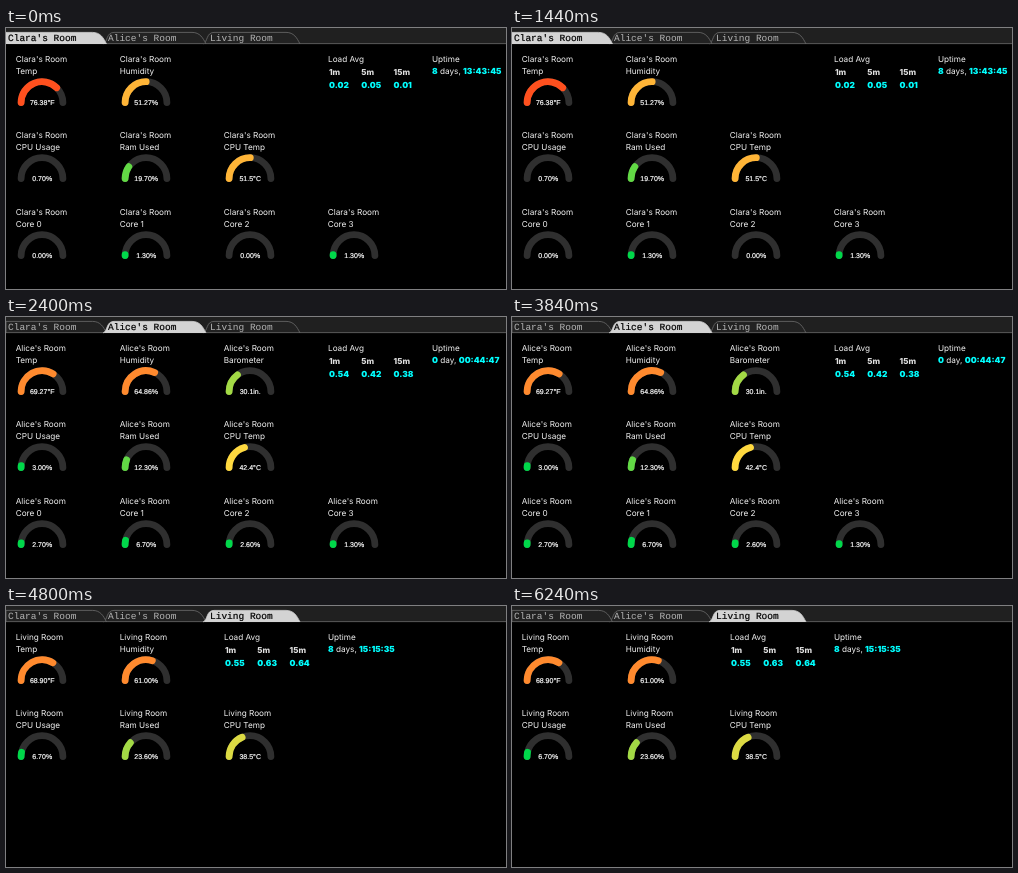
An HTML page for the animation above (7.2 s loop, 500 px wide and 261 px high).

```html
<!DOCTYPE html>
<html lang="en">
<head>
<meta charset="utf-8">
<title>Room monitor</title>
<style>
  html, body { margin: 0; width: 100%; height: 100%; overflow: hidden; background: #000; }
  svg { display: block; }
  text { white-space: pre; text-rendering: geometricPrecision; }
  .tab { font: 9.5px "Liberation Mono", "Courier New", monospace; fill: #b4b4b4; }
  .tab.on { fill: #000; stroke: #000; stroke-width: .2; }
  .label { font: 430 8.2px Inter, sans-serif; fill: #f0f0f0; }
  .value { font: 7px "Liberation Sans", Arial, sans-serif; fill: #fff; stroke: #fff; stroke-width: .2; text-anchor: middle; }
  .head { font: 800 8.2px Inter, sans-serif; fill: #e0e0e0; }
  .num { font: 900 8.4px Inter, sans-serif; fill: #0ff; }
</style>
</head>
<body>
<svg id="stage" width="500" height="261" viewBox="0 0 500 261"></svg>
<script>
const NS = "http://www.w3.org/2000/svg";
const stage = document.getElementById("stage");
const HOLD = 2400;
const COL = 104, ROW = 76.5;

const rooms = [
  {
    name: "Clara's Room",
    rows: [
      [["Temp", "76.38°F"], ["Humidity", "51.27%"]],
      [["CPU Usage", "0.70%"], ["Ram Used", "19.70%"], ["CPU Temp", "51.5°C"]],
      [["Core 0", "0.00%"], ["Core 1", "1.30%"], ["Core 2", "0.00%"], ["Core 3", "1.30%"]]
    ],
    load: ["0.02", "0.05", "0.01"], loadCol: 3,
    up: ["8", " days, ", "13:43:45"]
  },
  {
    name: "Alice's Room",
    rows: [
      [["Temp", "69.27°F"], ["Humidity", "64.86%"], ["Barometer", "30.1in."]],
      [["CPU Usage", "3.00%"], ["Ram Used", "12.30%"], ["CPU Temp", "42.4°C"]],
      [["Core 0", "2.70%"], ["Core 1", "6.70%"], ["Core 2", "2.60%"], ["Core 3", "1.30%"]]
    ],
    load: ["0.54", "0.42", "0.38"], loadCol: 3,
    up: ["0", " day, ", "00:44:47"]
  },
  {
    name: "Living Room",
    rows: [
      [["Temp", "68.90°F"], ["Humidity", "61.00%"]],
      [["CPU Usage", "6.70%"], ["Ram Used", "23.60%"], ["CPU Temp", "38.5°C"]]
    ],
    load: ["0.55", "0.63", "0.64"], loadCol: 2,
    up: ["8", " days, ", "15:15:35"]
  }
];

// Upper limit of each colour band
const bands = [
  [10, "#00d84a"], [20, "#62d945"], [35, "#a3da45"], [40, "#dcda43"],
  [50, "#ffd93f"], [60, "#ffb537"], [70, "#ff8a2e"], [101, "#ff501e"]
];
const bandColor = v => bands.find(b => v < b[0])[1];

function add(parent, tag, attrs, content) {
  const el = document.createElementNS(NS, tag);
  for (const k in attrs) el.setAttribute(k, attrs[k]);
  if (content !== undefined) el.textContent = content;
  return parent.appendChild(el);
}

const put = (g, cls, x, y, s) => add(g, "text", { class: cls, x, y }, s);

function arc(g, cx, cy, share, stroke) {
  const r = 20.9, a = Math.PI * (1 - share);
  const x = cx + r * Math.cos(a), y = cy - r * Math.sin(a);
  add(g, "path", {
    d: `M${cx - r},${cy}A${r},${r} 0 0 1 ${x},${y}`,
    fill: "none", stroke, "stroke-width": 6.8, "stroke-linecap": "round"
  });
}

function gauge(g, x, y, room, [label, value]) {
  put(g, "label", x - .3, y + 34.2, room);
  put(g, "label", x - .3, y + 45.6, label);
  const v = parseFloat(value), cx = x + 26, cy = y + 74.6;
  arc(g, cx, cy, 1, "#2f2f2f");
  if (v >= 1) arc(g, cx, cy, v / 102, bandColor(v));
  put(g, "value", cx + .2, y + 76.7, value);
}

function tab(g, i, on) {
  const l = i ? i * 100 - 3 : 0;
  const r = [100.5, 200, 294][i];
  const left = i ? `M${l},16C${l + 5},14 ${l + 3},4.4 ${l + 11},4.4` : "M0,16V4.4";
  add(g, "path", {
    d: `${left}H${r - 14}C${r - 6},4.4 ${r - 3},10 ${r},16`,
    fill: on ? "#d3d3d3" : "#222", stroke: on ? "#d3d3d3" : "#6c6c6c", "stroke-width": .8
  });
  put(g, on ? "tab on" : "tab", [2, 102, 204][i], 13, rooms[i].name);
}

function page(room, active) {
  const g = add(stage, "g", {});
  add(g, "rect", { width: 500, height: 16, fill: "#202020" });
  for (let i = 2; i >= 0; i--) if (i !== active) tab(g, i, false);
  add(g, "rect", { y: 15.3, width: 500, height: .8, fill: "#666" });
  tab(g, active, true);

  room.rows.forEach((row, j) =>
    row.forEach((cell, i) => gauge(g, 10 + COL * i, Math.floor(ROW * j), room.name, cell)));

  const lx = 10 + COL * room.loadCol, ux = lx + COL;
  put(g, "label", lx, 34.2, "Load Avg");
  ["1m", "5m", "15m"].forEach((s, i) => {
    put(g, "head", lx + 1 + 32.3 * i, 47, s);
    put(g, "num", lx + 1 + 32.3 * i, 60.2, room.load[i]);
  });
  put(g, "label", ux, 34.4, "Uptime");
  const line = put(g, "label", ux, 45.6);
  room.up.forEach((s, i) => add(line, "tspan", { class: i === 1 ? "label" : "num" }, s));
  return g;
}

const pages = rooms.map(page);
const start = performance.now();

function draw(now) {
  const t = Math.max(0, now - start) % (HOLD * pages.length);
  const shown = Math.floor(t / HOLD);
  pages.forEach((p, i) => { p.style.display = i === shown ? "" : "none"; });
  requestAnimationFrame(draw);
}
draw(start);
</script>
</body>
</html>
```
